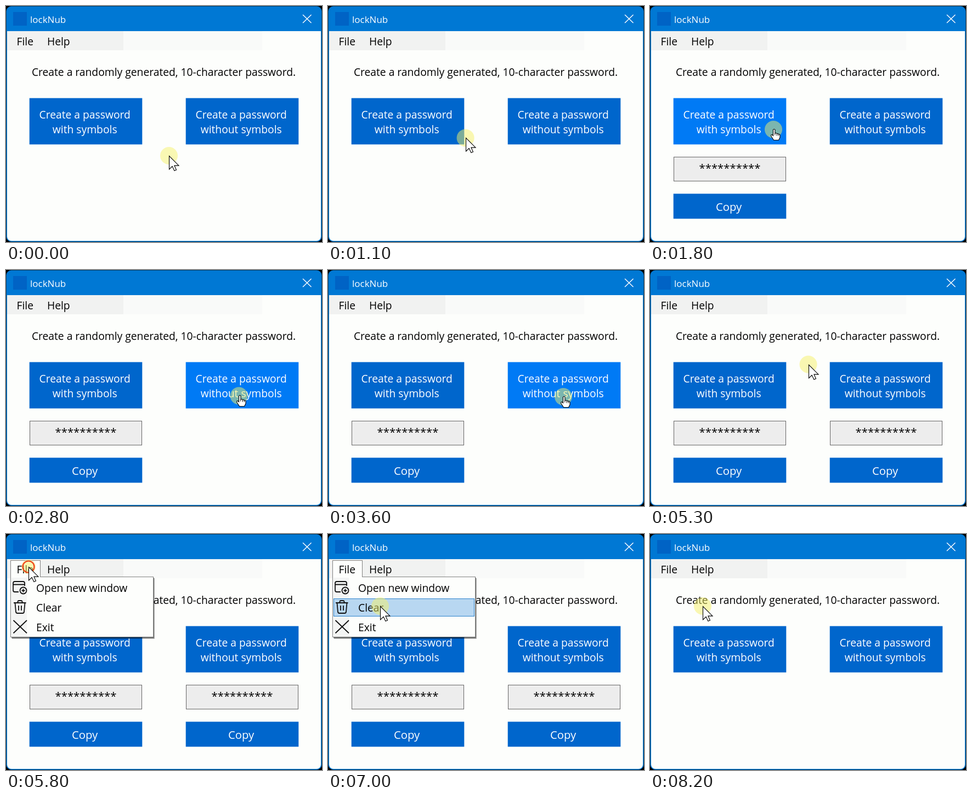
These frames come from a looping animation (576 by 432 pixels, 8.4 s). An HTML page with a canvas:

```html
<!DOCTYPE html>
<html lang="en">
<head>
<meta charset="utf-8">
<title>lockNub</title>
<style>
html, body { margin: 0; width: 100%; height: 100%; overflow: hidden; background: #000; }
canvas { display: block; width: 576px; height: 432px; }
</style>
</head>
<body>
<canvas id="stage" width="576" height="432"></canvas>
<script>
const ctx = document.getElementById('stage').getContext('2d');
const LOOP = 8400, STEP = 100;
const BLUE = '#0066cc', HOVER = '#007af5', PAPER = '#fdfefc';

// Pointer stops: time, x, y
const PATH = [
  [0, 297, 274], [400, 296, 270], [500, 296, 270], [700, 294, 268], [800, 294, 268],
  [1300, 227, 227], [1800, 225, 226], [2600, 424, 230], [3200, 426, 231],
  [3600, 429, 232], [4100, 425, 233], [4500, 423, 234], [5100, 423, 234],
  [5600, 41, 60], [6000, 41, 60], [6900, 95, 132], [LOOP, 96, 132]
];
const CLICKS = [1400, 3800, 5700, 7400];
const LEFT_ON = 1500, RIGHT_ON = 3900, MENU_ON = 5700, CLEARED = 7500;

const ARROW = new Path2D('M0 0V24.5L5.6 19L9.4 27L13 25.4L9.4 17.6H17.5Z');
const HAND = new Path2D('M-1 0Q.7-2 2.4 0V6.5Q4.5 5 6 7.5Q8 6 9 8.5Q11.5 7.5 11.5 10.5V14L9 19H0L-4.5 12Q-5.5 8.5-3 9L-1 11Z');
const KNUCKLES = new Path2D('M2.4 6.5V10M6 7.5V11M9 8.5V11');
const ICONS = [
  new Path2D('M23 106H16Q13 106 13 103V90Q13 87 16 87H31Q34 87 34 90V95M13 92.5H34M37.5 103.5A6 6 0 1 1 25.5 103.5A6 6 0 1 1 37.5 103.5M28.5 103.5H34.5M31.5 100.5V106.5'),
  new Path2D('M14 126H36.5M21.5 126V124Q21.5 122 23.5 122H27.5Q29.5 122 29.5 124V126M16.5 126L18 142.5Q18.5 145 20.5 145H30.5Q32.5 145 33 142.5L34.5 126M23 131V140M28 131V140'),
  new Path2D('M13.5 158L38 181.5M38 158L13.5 181.5')
];

function rect(x, y, w, h, fill, line) {
  ctx.fillStyle = fill;
  ctx.fillRect(x, y, w, h);
  if (line) {
    ctx.strokeStyle = line;
    ctx.lineWidth = 1;
    ctx.strokeRect(x + 0.5, y + 0.5, w - 1, h - 1);
  }
}

function text(str, x, y, color = '#000', align = 'left', size = 19.25) {
  ctx.font = `${size}px "Open Sans", "Noto Sans", sans-serif`;
  ctx.textAlign = align;
  ctx.fillStyle = color;
  ctx.fillText(str, x, y);
}

function stroke(path, color, width) {
  ctx.strokeStyle = color;
  ctx.lineWidth = width;
  ctx.stroke(path);
}

function disc(x, y, r) {
  ctx.beginPath();
  ctx.arc(x, y, r, 0, Math.PI * 2);
}

function pointerAt(t) {
  const i = PATH.findIndex(p => p[0] > t);
  const [t0, x0, y0] = PATH[i - 1], [t1, x1, y1] = PATH[i];
  const k = (t - t0) / (t1 - t0), e = k * k * (3 - 2 * k);
  return { x: x0 + (x1 - x0) * e, y: y0 + (y1 - y0) * e };
}

const inside = (p, x, y, w, h) => p.x >= x && p.x < x + w && p.y >= y && p.y < y + h;

function drawWindow() {
  rect(0, 0, 576, 432, '#000');
  ctx.fillStyle = '#0078d4';
  ctx.beginPath();
  ctx.roundRect(0.5, 0.5, 575, 431, 9);
  ctx.fill();
  ctx.fillStyle = PAPER;
  ctx.beginPath();
  ctx.roundRect(2, 46, 572, 384, [0, 0, 8, 8]);
  ctx.fill();
  rect(2, 46, 212, 35, '#f1f2f1');
  rect(214, 46, 253, 35, '#f9faf9');
  rect(13, 11, 25, 25, '#0063c5');
  text('lockNub', 44, 31, '#fff', 'left', 17);
  stroke(new Path2D('M541 16L556.5 31M556.5 16L541 31'), '#fff', 1.4);
  text('Create a randomly generated, 10-character password.', 287.5, 128, '#000', 'center');
}

// Returns true when the pointer is over the column's main button
function drawColumn(x, kind, filled, p) {
  const over = inside(p, x, 169, 205, 84), mid = x + 100.7;
  const button = (y, h, fill) => rect(x - 0.3, y - 0.4, 205.6, h + 0.8, fill);
  button(169, 84, over ? HOVER : BLUE);
  text('Create a password', mid, 206, '#fff', 'center');
  text(kind + ' symbols', mid, 233, '#fff', 'center');
  if (filled) {
    rect(x, 276, 205, 45, '#ededed', '#666');
    text('*'.repeat(10), x + 102.5, 304, '#000', 'center', 20.3);
    button(344, 45, BLUE);
    text('Copy', mid, 375, '#fff', 'center', 20.3);
  }
  return over;
}

function drawMenu(open, p) {
  if (open) {
    rect(11, 81, 260, 111, 'rgba(0,0,0,.25)');
    rect(10, 80, 260, 111, 'rgba(0,0,0,.4)');
    rect(8, 78, 261, 111, PAPER, '#808080');
    rect(10, 80, 28, 107, '#f4f5f4');
    rect(8, 48, 55, 31, PAPER, '#808080');
    rect(9, 78, 53, 1, PAPER);
    ['Open new window', 'Clear', 'Exit'].forEach((label, i) => {
      const y = 82 + i * 36;
      if (inside(p, 10, y, 257, 33)) rect(10, y, 257, 33, '#b8d7f1', '#2a82cc');
      stroke(ICONS[i], '#111', 1.8);
      text(label, 55, y + 24);
    });
  } else if (inside(p, 8, 48, 55, 31)) {
    rect(8, 48, 55, 31, '#b8d7f1', '#2a82cc');
  }
  text('File', 19.5, 72);
  text('Help', 75, 72);
}

function drawPointer(p, hand, t) {
  const click = CLICKS.find(c => t >= c && t < c + 300);
  const clicked = click !== undefined;
  disc(p.x, p.y, clicked ? 13 : 16);
  ctx.fillStyle = 'rgba(245,241,105,.5)';
  ctx.fill();
  if (clicked) {
    disc(p.x, p.y, 5.5 + (t - click) / 20);
    ctx.strokeStyle = '#f0401c';
    ctx.lineWidth = 2.2;
    ctx.stroke();
  }
  ctx.save();
  ctx.translate(Math.round(p.x) + 0.5, Math.round(p.y) + 0.5);
  const shape = hand ? HAND : ARROW;
  ctx.fillStyle = '#fff';
  ctx.fill(shape);
  stroke(shape, '#000', 1.1);
  if (hand) stroke(KNUCKLES, '#000', 1);
  ctx.restore();
}

function frame(now) {
  const t = Math.floor((now % LOOP) / STEP) * STEP;
  const p = pointerAt(t);
  drawWindow();
  const overLeft = drawColumn(43, 'with', t >= LEFT_ON && t < CLEARED, p);
  const overRight = drawColumn(328, 'without', t >= RIGHT_ON && t < CLEARED, p);
  drawMenu(t >= MENU_ON && t < CLEARED, p);
  drawPointer(p, overLeft || overRight, t);
}

const start = performance.now();
function tick() {
  frame(performance.now() - start);
  requestAnimationFrame(tick);
}
tick();
</script>
</body>
</html>
```
